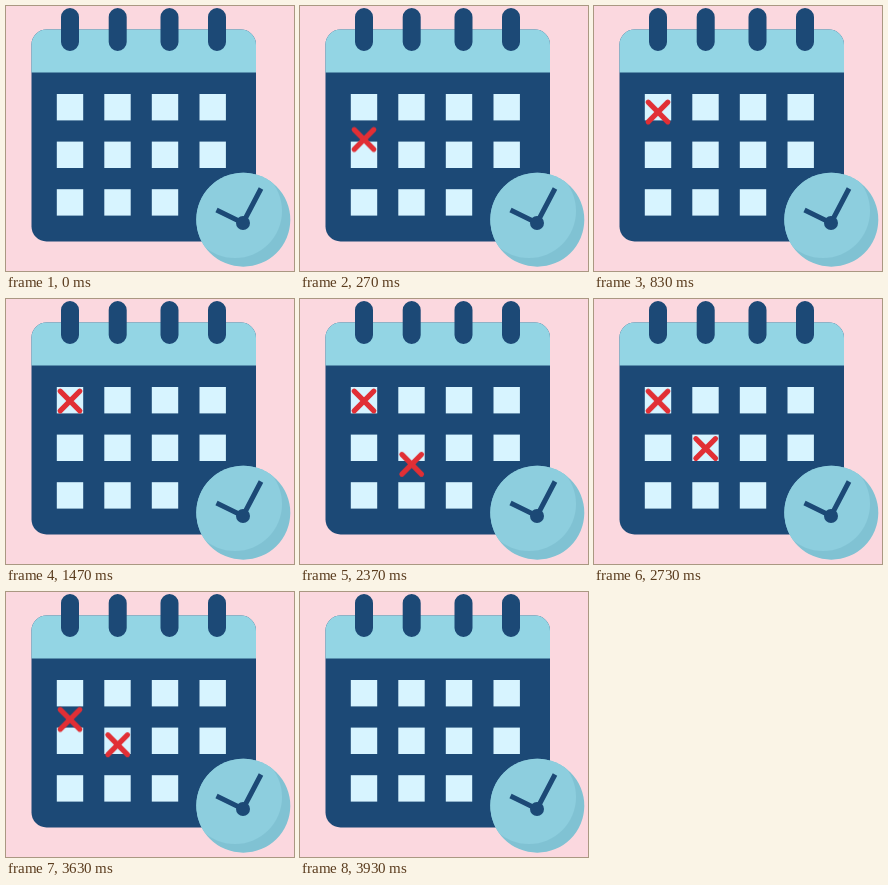
Recreate the animation shown at these times as an HTML page without scripts. Size 288 by 265 pixels, loop 4010 ms.

```html
<!DOCTYPE html>
<html lang="en">
<head>
<meta charset="utf-8">
<title>Calendar</title>
<style>
  html, body { margin: 0; width: 100%; height: 100%; overflow: hidden; background: #fbd8df; }
  svg { display: block; width: 100vw; height: 100vh; }

  .rings { stroke: #1c4976; stroke-width: 18; stroke-linecap: round; }
  .days { fill: #d7f4ff; }
  .hands { fill: none; stroke: #1c4976; stroke-width: 5; }
  .cross { fill: none; stroke: #e12f35; stroke-width: 5.2; stroke-linecap: round; }

  .mark { opacity: 0; animation: 4010ms linear infinite; }
  .first { animation-name: rise-first, fade-first; }
  .second { animation-name: rise-second, fade-second; }

  /* Cubic ease out on the way in, cubic ease in on the way out */
  @keyframes rise-first {
    0% { transform: translateY(60px); animation-timing-function: cubic-bezier(.333, 1, .667, 1); }
    34.9% { transform: none; }
    64.3% { transform: none; animation-timing-function: cubic-bezier(.333, 0, .667, 0); }
    99.25%, 100% { transform: translateY(60px); }
  }
  @keyframes fade-first {
    0%, 1.4% { opacity: 0; }
    6.2%, 93% { opacity: 1; }
    97.9%, 100% { opacity: 0; }
  }
  @keyframes rise-second {
    0%, 54.1% { transform: translateY(60px); animation-timing-function: cubic-bezier(.333, 1, .667, 1); }
    68.1% { transform: none; }
    85.3% { transform: none; animation-timing-function: cubic-bezier(.333, 0, .667, 0); }
    99.25%, 100% { transform: translateY(60px); }
  }
  @keyframes fade-second {
    0%, 54.7% { opacity: 0; }
    56.6%, 96% { opacity: 1; }
    97.9%, 100% { opacity: 0; }
  }
</style>
</head>
<body>
<svg viewBox="0 0 288 265" preserveAspectRatio="none">
  <defs>
    <clipPath id="page"><rect x="25.5" y="23.5" width="224.5" height="212" rx="15"/></clipPath>
    <clipPath id="face"><circle cx="237.3" cy="213.7" r="47"/></clipPath>
    <rect id="day" width="26.4" height="26.4"/>
    <g id="row">
      <use href="#day" x="50.8"/>
      <use href="#day" x="98.3"/>
      <use href="#day" x="145.8"/>
    </g>
    <path id="cross" class="cross" d="M-9.8-9.8 9.8 9.8M9.8-9.8-9.8 9.8"/>
  </defs>

  <rect width="288" height="265" fill="#fbd8df"/>

  <g clip-path="url(#page)">
    <rect x="25" y="23" width="226" height="213" fill="#1c4976"/>
    <rect x="25" y="23" width="226" height="43.5" fill="#93d5e4"/>
  </g>
  <path class="rings" d="M64 11V36M111.7 11V36M163.5 11V36M211 11V36"/>

  <g class="days">
    <use href="#row" y="88"/>
    <use href="#row" y="135.6"/>
    <use href="#row" y="183.2"/>
    <use href="#day" x="193.5" y="88"/>
    <use href="#day" x="193.5" y="135.6"/>
  </g>

  <g clip-path="url(#face)">
    <rect x="190" y="166" width="95" height="96" fill="#80c2d3"/>
    <circle cx="229" cy="205" r="47" fill="#8dcede"/>
  </g>
  <path class="hands" d="M210.5 204 237 217 255 182.5"/>
  <circle cx="237" cy="217" r="7" fill="#1c4976"/>

  <g class="mark first"><use href="#cross" x="64" y="102"/></g>
  <g class="mark second"><use href="#cross" x="111.7" y="149.5"/></g>
</svg>
</body>
</html>
```
